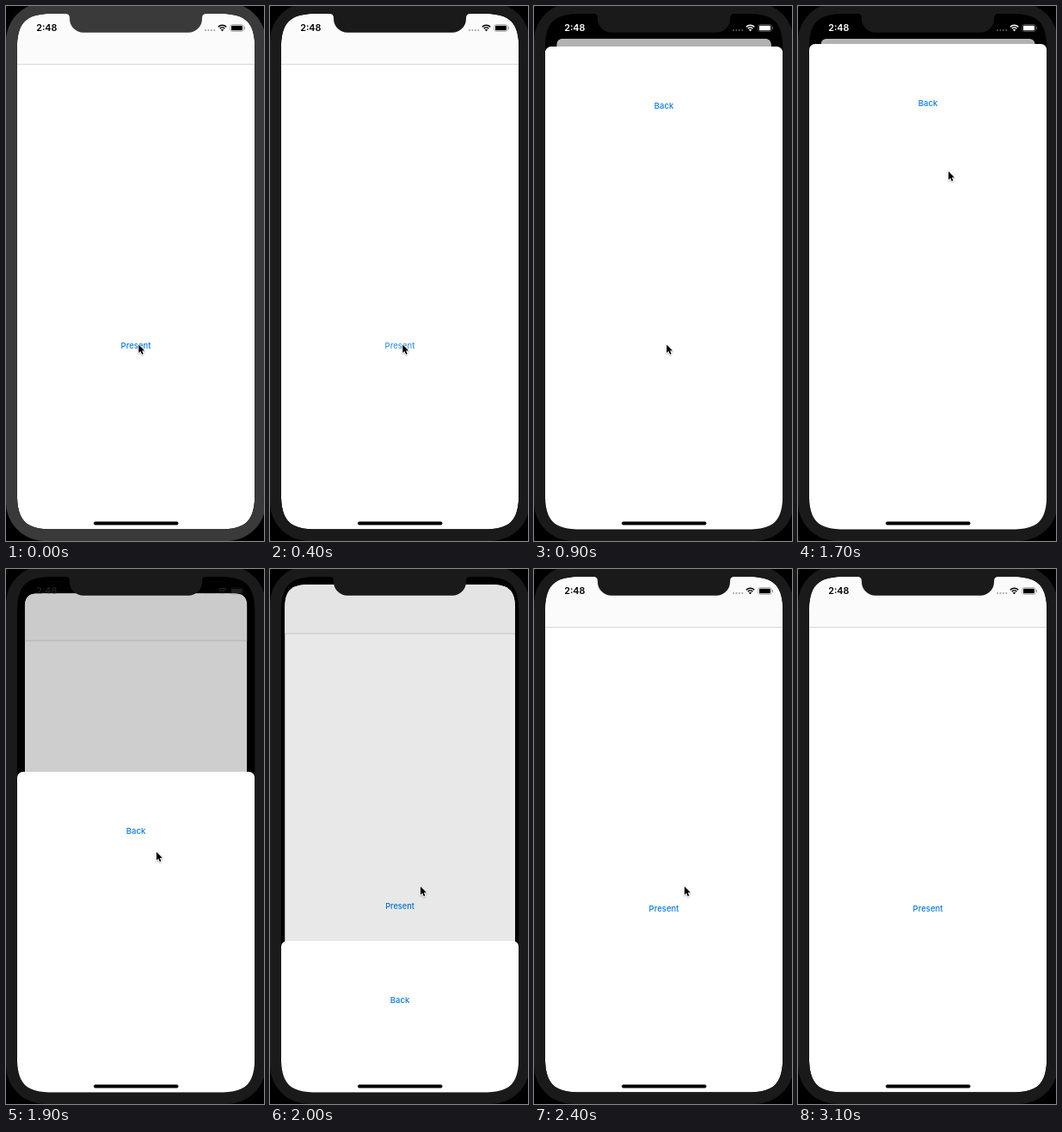
Write an HTML page with a canvas that moves like this. It is 300 px wide and 620 px high and loops after 4.1 s.

```html
<!DOCTYPE html>
<html lang="en">
<head>
<meta charset="utf-8">
<title>Card presentation</title>
<style>
  html, body { margin: 0; width: 100%; height: 100%; overflow: hidden; background: #000; }
  canvas { display: block; width: 300px; height: 620px; }
</style>
</head>
<body>
<canvas id="stage"></canvas>
<script>
const W = 300, H = 620, LOOP = 4100, STEP = 100;
const SCREEN = { x: 12.9, y: 9, w: 276.4, h: 597.6, r: 31 };
const MID = 151, BOTTOM = 607, CARD_TOP = 44;
const BLUE = '#087ae8', FONT = 'Inter, "Noto Sans", sans-serif';

const canvas = document.getElementById('stage');
const ctx = canvas.getContext('2d');
const ratio = window.devicePixelRatio || 1;
canvas.width = W * ratio;
canvas.height = H * ratio;

const clamp = v => Math.max(0, Math.min(1, v));
const mix = (a, b, k) => a + (b - a) * k;
const gray = v => `rgb(${Math.round(v)},${Math.round(v)},${Math.round(v)})`;

// Keys are [time, value, value, ...]
function track(keys, t) {
  if (t <= keys[0][0]) return keys[0].slice(1);
  for (let i = 1; i < keys.length; i++) {
    const a = keys[i - 1], b = keys[i];
    if (t <= b[0]) {
      const k = (t - a[0]) / (b[0] - a[0]);
      return a.slice(1).map((v, n) => mix(v, b[n + 1], k));
    }
  }
  return keys[keys.length - 1].slice(1);
}

const CURSOR = [
  [0, 154.3, 392.5], [1000, 154.3, 392.5], [1100, 161, 330], [1200, 173, 203],
  [1300, 174, 197], [1400, 174.5, 193.5], [1500, 175, 191.7], [1700, 175, 191.7],
  [1800, 175, 250], [1900, 175, 328], [2000, 175, 368], [2900, 175, 368],
  [3000, 167, 385]
];
const DISMISS = [
  [1700, 44], [1800, 105], [1900, 235], [2000, 431], [2100, 550],
  [2200, 596], [2300, 606], [2400, BOTTOM]
];
const BEZEL = [[0, 58], [100, 42], [200, 26]];
const PRESS = [[100, 1], [200, 0.4], [300, 0.4], [400, 0.8], [500, 1]];

function cardTop(t) {
  if (t >= 1700) return track(DISMISS, t)[0];
  const s = Math.max(0, t - 451) * 0.0163;
  return mix(CARD_TOP, BOTTOM, (1 + s) * Math.exp(-s));
}

function roundRect(x, y, w, h, r) {
  ctx.beginPath();
  ctx.roundRect(x, y, w, h, r);
}

// Rectangle whose corners ease into the sides
function smoothRect({ x, y, w, h }, r) {
  const e = r * 1.35, k = r * 0.32, right = x + w, bottom = y + h;
  ctx.beginPath();
  ctx.moveTo(x, y + e);
  ctx.bezierCurveTo(x, y + k, x + k, y, x + e, y);
  ctx.lineTo(right - e, y);
  ctx.bezierCurveTo(right - k, y, right, y + k, right, y + e);
  ctx.lineTo(right, bottom - e);
  ctx.bezierCurveTo(right, bottom - k, right - k, bottom, right - e, bottom);
  ctx.lineTo(x + e, bottom);
  ctx.bezierCurveTo(x + k, bottom, x, bottom - k, x, bottom - e);
  ctx.closePath();
}

function text(str, x, y, font, color, align = 'center') {
  ctx.font = `${font} ${FONT}`;
  ctx.textAlign = align;
  ctx.fillStyle = color;
  ctx.fillText(str, x, y);
}

function drawBack(p, press) {
  const s = mix(1, 0.902, p);
  ctx.save();
  ctx.translate(MID, mix(SCREEN.y, 38, p));
  ctx.scale(s, s);
  ctx.translate(-MID, -SCREEN.y);
  smoothRect(SCREEN, mix(8, SCREEN.r, (1 - p) ** 1.3));
  ctx.clip();
  ctx.fillStyle = '#fff';
  ctx.fillRect(SCREEN.x, SCREEN.y, SCREEN.w, SCREEN.h);
  ctx.fillStyle = '#fbfbfb';
  ctx.fillRect(SCREEN.x, SCREEN.y, SCREEN.w, 58.5);
  ctx.fillStyle = '#d2d2d2';
  ctx.fillRect(SCREEN.x, 67.2, SCREEN.w, 0.9);
  ctx.globalAlpha = press;
  text('Present', MID, 397.3, '500 9.5px', BLUE);
  ctx.restore();
  ctx.fillStyle = `rgba(0,0,0,${0.29 * p})`;
  ctx.fillRect(0, 0, W, H);
}

function drawCard(top) {
  if (top >= BOTTOM) return;
  roundRect(SCREEN.x, top, SCREEN.w, H, 7);
  ctx.fillStyle = '#fff';
  ctx.fill();
  text('Back', MID, top + 71.7, '500 9.5px', BLUE);
}

function drawStatus(shade, alpha) {
  const color = gray(255 * shade);
  ctx.save();
  ctx.globalAlpha = alpha;
  text('2:48', 35.2, 29.3, '600 10.8px', color, 'left');

  ctx.globalAlpha = alpha * 0.32;
  for (let i = 0; i < 4; i++) {
    ctx.beginPath();
    ctx.arc(232 + i * 3.4, 28.1, 1.1, 0, 7);
    ctx.fill();
  }

  ctx.globalAlpha = alpha;
  ctx.strokeStyle = color;
  ctx.lineWidth = 1.5;
  const a = -Math.PI * 0.75, b = -Math.PI * 0.25;
  for (const r of [4, 6.7]) {
    ctx.beginPath();
    ctx.arc(251.5, 29, r, a, b);
    ctx.stroke();
  }
  ctx.beginPath();
  ctx.moveTo(251.5, 29.2);
  ctx.arc(251.5, 29.2, 2.3, a, b);
  ctx.fill();

  roundRect(262, 22.8, 12.8, 5.4, 1);
  ctx.fill();
  ctx.globalAlpha = alpha * 0.45;
  ctx.lineWidth = 0.7;
  roundRect(260.8, 21.6, 15.2, 7.8, 2.2);
  ctx.stroke();
  ctx.fillRect(276.8, 24.1, 1, 2.8);
  ctx.restore();
}

function drawNotch(color) {
  const left = 74, right = 2 * MID - left, base = 30.8, r = 16;
  ctx.beginPath();
  ctx.moveTo(left - 5, 8);
  ctx.lineTo(left - 5, 9);
  ctx.quadraticCurveTo(left, 9, left, 14);
  ctx.arcTo(left, base, left + r, base, r);
  ctx.arcTo(right, base, right, 14, r);
  ctx.lineTo(right, 14);
  ctx.quadraticCurveTo(right, 9, right + 5, 9);
  ctx.lineTo(right + 5, 8);
  ctx.closePath();
  ctx.fillStyle = color;
  ctx.fill();
}

function drawCursor(x, y) {
  ctx.save();
  ctx.translate(x, y);
  ctx.scale(0.87, 0.87);
  ctx.beginPath();
  ctx.moveTo(0, 0);
  ctx.lineTo(0, 11);
  ctx.lineTo(2.5, 8.7);
  ctx.lineTo(4.4, 13);
  ctx.lineTo(6.2, 12.2);
  ctx.lineTo(4.4, 8);
  ctx.lineTo(7.8, 7.8);
  ctx.closePath();
  ctx.shadowColor = 'rgba(0,0,0,.3)';
  ctx.shadowBlur = 2 * ratio;
  ctx.shadowOffsetY = ratio;
  ctx.strokeStyle = '#fff';
  ctx.lineWidth = 1.5;
  ctx.stroke();
  ctx.shadowColor = 'transparent';
  ctx.fillStyle = '#000';
  ctx.fill();
  ctx.restore();
}

function draw(t) {
  const bezel = gray(track(BEZEL, t)[0]);
  const top = cardTop(t);
  const p = clamp((BOTTOM - top) / (BOTTOM - CARD_TOP));

  ctx.setTransform(ratio, 0, 0, ratio, 0, 0);
  ctx.fillStyle = '#000';
  ctx.fillRect(0, 0, W, H);
  roundRect(0, -4, 2 * MID, H + 4, 45);
  ctx.fillStyle = bezel;
  ctx.fill();

  ctx.save();
  smoothRect(SCREEN, SCREEN.r);
  ctx.fillStyle = '#000';
  ctx.fill();
  ctx.clip();
  drawBack(p, track(PRESS, t)[0]);
  drawCard(top);
  const closing = t > 1700;
  const shown = closing ? Math.max(clamp((p - 0.5) / 0.35), clamp(1 - p / 0.05)) : 1;
  drawStatus(clamp((p - 0.54) / 0.45), shown);
  roundRect(102, 597.6, 98.5, 3.8, 1.9);
  ctx.fillStyle = '#000';
  ctx.fill();
  ctx.restore();

  drawNotch(bezel);
  if (t < 3100) drawCursor(...track(CURSOR, t));
}

function frame() {
  const t = performance.now() % LOOP;
  draw(Math.floor(t / STEP) * STEP);
  requestAnimationFrame(frame);
}
frame();
</script>
</body>
</html>
```
